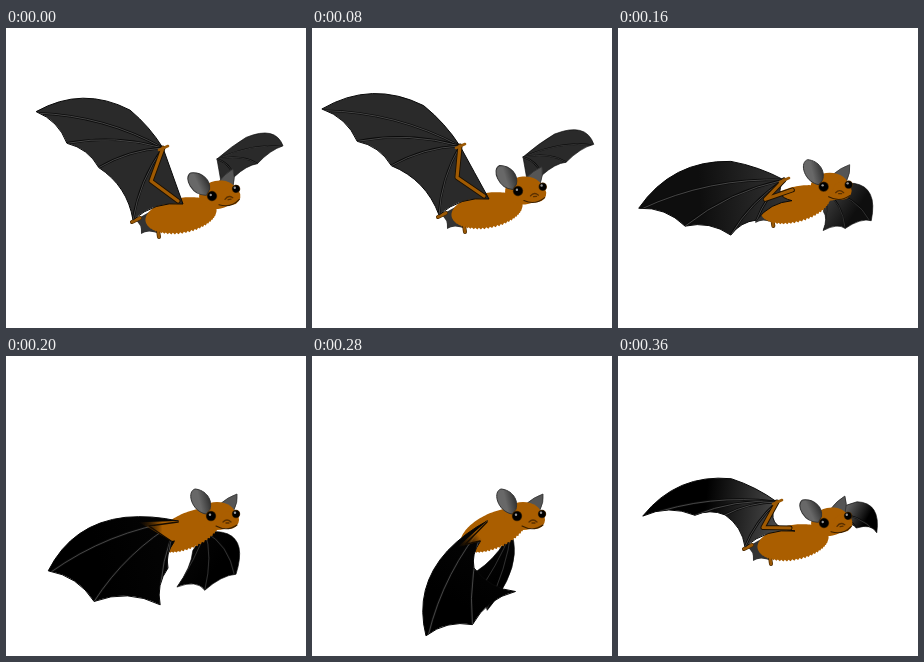
These frames come from a looping animation (300 px wide and 300 px high, 400 ms). An HTML page with a canvas:

```html
<!DOCTYPE html>
<html lang="en">
<head>
<meta charset="utf-8">
<title>Flying bat</title>
<style>
html, body { margin: 0; height: 100%; overflow: hidden; background: #fff; }
canvas { display: block; width: 300px; height: 300px; }
</style>
</head>
<body>
<canvas id="stage" width="300" height="300"></canvas>
<script>
const ctx = document.getElementById('stage').getContext('2d');
const FUR = '#aa5e00';
const STEP = 40;

// One wing beat in ten steps; the rest of the bat follows from these.
const beat = {
  swing: [16, 16, 15, -1, -11, -21, -47, -62, -29, -6],
  reach: [132, 138, 143, 154, 148, 139, 113, 130, 106, 135],
  spread: [33, 32, 31, 14, 35, 57, 53, 50, 60, 8],
  wristX: [157, 152, 148, 159, 166, 172, 175, 175, 172, 159],
  wristY: [120, 119, 118, 138, 152, 165, 165, 165, 167, 146],
  bodyY: [187, 185, 182, 179, 176, 174, 173, 174, 176, 186]
};

const clamp = v => Math.min(1, Math.max(0, v));
const lerp = (a, b, k) => a + (b - a) * k;
const mix = (p, q, k) => p.map((v, i) => lerp(v, q[i], k));
const rad = deg => deg * Math.PI / 180;
const polar = (deg, r) => [-r * Math.cos(rad(deg)), -r * Math.sin(rad(deg))];
const grey = v => `rgb(${v},${v},${v})`;

function stroke(path, color, width) {
  ctx.strokeStyle = color;
  ctx.lineWidth = width;
  ctx.stroke(path);
}

function fill(path, color) {
  ctx.fillStyle = color;
  ctx.fill(path);
}

function polyline(...points) {
  const path = new Path2D();
  points.forEach(p => path.lineTo(...p));
  return path;
}

function ellipse(x, y, rx, ry, color) {
  const path = new Path2D();
  path.ellipse(x, y, rx, ry, 0, 0, 7);
  fill(path, color);
}

function gradient(from, to, first, last) {
  const g = ctx.createLinearGradient(...from, ...to);
  g.addColorStop(0, first);
  g.addColorStop(0.4, first);
  g.addColorStop(1, last);
  return g;
}

// Curve that bows sideways by a share of its own length.
function bow(path, [x, y], [u, v], k) {
  path.quadraticCurveTo((x + u) / 2 - k * (v - y), (y + v) / 2 + k * (u - x), u, v);
}

// The fingers fan out from the wrist, which lies at the origin.
function handOf({ swing, reach, spread }, down) {
  return {
    knuckle: polar(swing + lerp(33, 25, down), reach * 0.38),
    tip: polar(swing, reach),
    fingers: [
      polar(swing - 0.4 * spread, reach * (0.58 + 0.0045 * spread)),
      polar(swing - spread, reach * (0.36 + 0.0045 * spread))
    ]
  };
}

function drawWing({ knuckle, tip, fingers }, roots, elbow, tuck, down) {
  const base = roots[roots.length - 1];
  const path = new Path2D();
  path.moveTo(0, 0);
  bow(path, [0, 0], knuckle, 0.08);
  bow(path, knuckle, tip, 0.27);
  let last = tip;
  for (const p of [...fingers, ...roots]) {
    bow(path, last, p, -0.22);
    last = p;
  }
  path.quadraticCurveTo(...mix(mix(base, [0, 0], 0.5), elbow, tuck), 0, 0);
  path.closePath();

  const outer = 42 * (1 - Math.max(tuck, down));
  const inner = lerp(42 + 50 * tuck, 4, down);
  fill(path, gradient(tip, base, grey(outer), grey(inner)));
  stroke(path, '#080808', 1);

  ctx.save();
  ctx.clip(path);
  for (const p of [mix(tip, fingers[0], 0.05), ...fingers, ...roots.slice(0, -1)]) {
    const bone = new Path2D();
    bone.moveTo(0, 0);
    bow(bone, [0, 0], p, 0.12);
    stroke(bone, '#0a0a0a', 2.4);
    stroke(bone, '#555', 0.8);
  }
  ctx.restore();
}

function drawBody(x, y, angle) {
  ctx.save();
  ctx.translate(x, y);
  ctx.rotate(rad(angle));
  const outline = Array.from({ length: 120 }, (_, i) => {
    const a = rad(i * 3);
    const tuft = i % 2 && a > 0.3 && a < 2.9 ? 1.1 : 1;
    return [36 * Math.cos(a), 17 * tuft * Math.sin(a)];
  });
  fill(polyline(...outline), FUR);
  ctx.restore();
}

function drawFeet(x, y) {
  ctx.save();
  ctx.translate(x, y);
  fill(new Path2D('M-30-4L-46 5Q-39 9-40 19Q-33 14-21 19Z'), '#333');
  for (const d of ['M-41 3L-49 7', 'M-23 15L-22 22']) {
    stroke(new Path2D(d), '#4a2900', 4);
    stroke(new Path2D(d), '#9a5804', 2.6);
  }
  ctx.restore();
}

function drawHead(x, y, angle) {
  ctx.save();
  ctx.translate(x, y);
  ctx.rotate(rad(angle));

  const farEar = new Path2D('M9-12Q17-19 26-22Q27-14 23-6Z');
  fill(farEar, '#555');
  stroke(farEar, '#333', 0.8);

  ellipse(6, 0, 19, 14, FUR);
  ellipse(18.5, 4, 9.5, 9, FUR);

  const nearEar = new Path2D('M-5-2C-19-4-25-24-16-27C-5-26 2-16-1-7Z');
  fill(nearEar, gradient([-18, -10], [0, -14], '#686868', '#303030'));
  stroke(nearEar, '#333', 1);

  for (const [ex, ey, r] of [[0, 0, 5.2], [25, -2, 4.2]]) {
    ellipse(ex, ey, r, r, '#4d2b00');
    ellipse(ex, ey, r - 0.7, r - 0.7, '#000');
    ellipse(ex - 1, ey - 1.3, 1.2, 1.2, '#999');
  }
  stroke(new Path2D('M12 6Q16 2 20 6M15 7L18 7'), '#5a3000', 1.3);
  stroke(new Path2D('M5 10Q16 16 26 9'), '#3a2000', 1.1);
  ctx.restore();
}

function drawRaisedArm(elbow, shoulder) {
  const arm = polyline([0, 0], elbow, shoulder);
  stroke(arm, '#1c1000', 5);
  stroke(arm, '#a05a02', 3.2);
  stroke(polyline([-4, 2], [5, -2]), '#9a5804', 2.6);
}

function drawLoweredArm([x, y]) {
  const end = [x * 0.75, y * 0.75 + 4];
  fill(polyline([0, 0], end, [-6, 20], [4, 18]),
    gradient([0, 0], end, FUR, 'rgba(60,32,0,0)'));
  stroke(polyline([0, 1], [x * 0.55, y * 0.55 + 7], [-7, 20]), '#160c00', 1.4);
}

function draw(step) {
  const pose = {};
  for (const name in beat) pose[name] = beat[name][step];
  const { wristX, wristY, bodyY } = pose;
  const down = clamp((wristY - 146) / 18);
  const tuck = clamp((wristY - 120) / 20) * (1 - down);
  const bodyX = lerp(175, 182, down);
  const hand = handOf(pose, down);
  const fromWrist = (dx, dy) => [bodyX + dx - wristX, bodyY + dy - wristY];

  const base = mix(fromWrist(2, -11), fromWrist(-14, 12), down);
  const tail = mix(fromWrist(-48, 5), fromWrist(-20, 38), down);
  const elbow = [bodyX - 30 - wristX, base[1] / 2 + 5 + 6 * tuck];

  ctx.clearRect(0, 0, 300, 300);
  ctx.lineCap = ctx.lineJoin = 'round';

  // The far wing is the same hand seen mirrored and foreshortened.
  ctx.save();
  ctx.translate(lerp(211, 199, down), wristY + 11);
  ctx.transform(-0.4, -0.08, -0.42, 0.64, 0, 0);
  drawWing(hand, [[-40 * (1 - down), 29]], [0, 0], tuck, down);
  ctx.restore();

  if (down < 0.5) drawFeet(bodyX, bodyY);
  drawBody(bodyX, bodyY, lerp(-10, -25, down));

  ctx.save();
  ctx.translate(wristX, wristY);
  drawWing(hand, [tail, base], elbow, tuck, down);
  if (down < 0.5) drawRaisedArm(elbow, fromWrist(-3, -14));
  else drawLoweredArm(hand.knuckle);
  ctx.restore();

  const [hx, hy] = mix([31, -19], [23, -14], down);
  drawHead(bodyX + hx, bodyY + hy, -12 * clamp((bodyY - 179) / 7));
}

function tick() {
  draw(Math.floor(performance.now() / STEP) % 10);
  requestAnimationFrame(tick);
}
tick();
</script>
</body>
</html>
```
